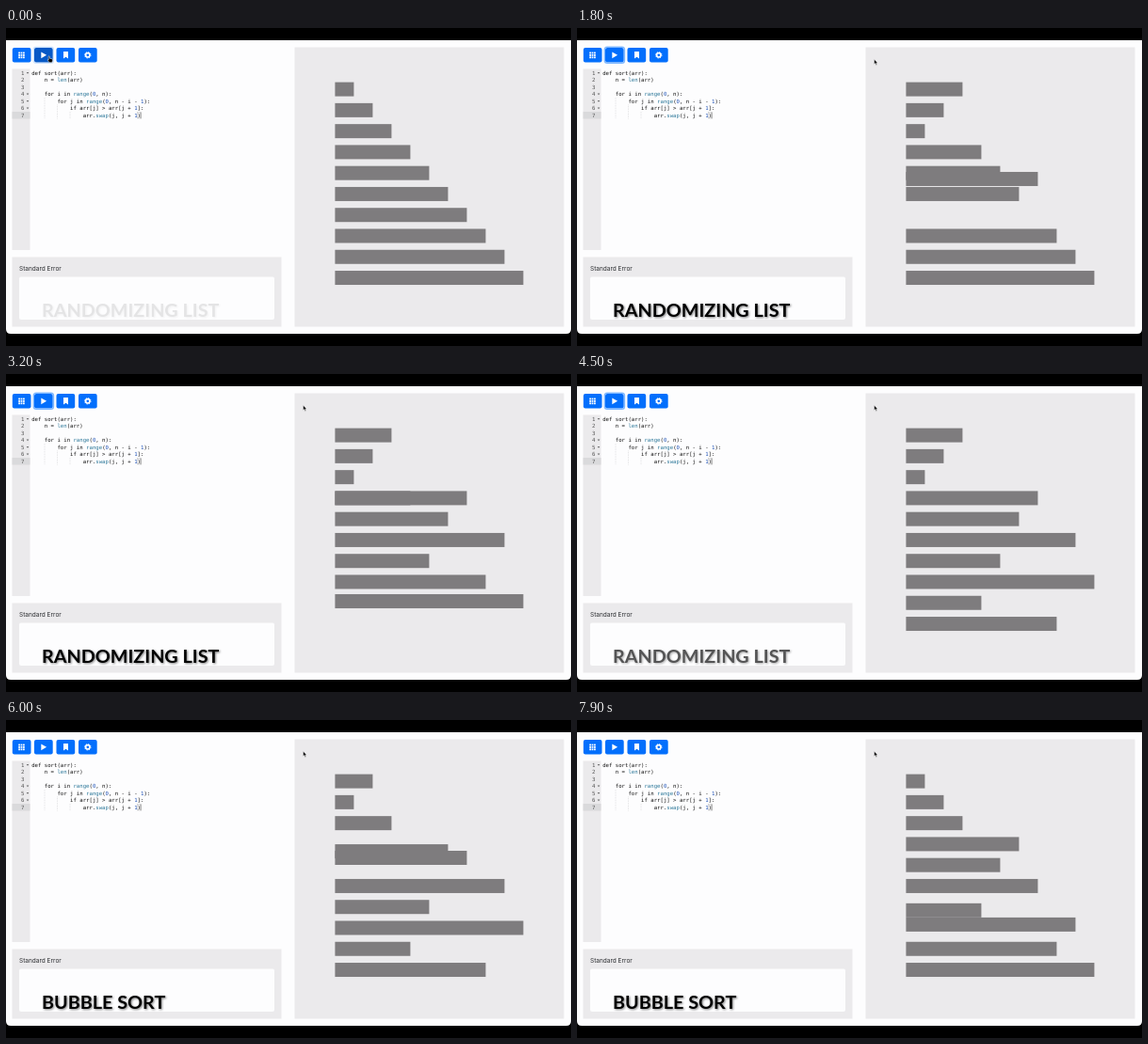
Write an HTML page that moves like this. It is 600x338 px and loops after 8 s.

```html
<!DOCTYPE html>
<html lang="en">
<head>
<meta charset="utf-8">
<title>Bubble sort</title>
<style>
  html, body { margin: 0; width: 100%; height: 100%; overflow: hidden; background: #000; }
  svg { display: block; width: 100vw; height: 100vh; }
  .panel { fill: #ebeaec; }
  .page { fill: #fdfdfe; }
  .button { fill: #036ffc; }
  .icon { fill: #fff; }
  .code { font: 5.66px "DejaVu Sans Mono", monospace; fill: #111; white-space: pre; }
  .fn { fill: #2b7799; }
  .num { fill: #2456b8; }
  .gutter { fill: #555; text-anchor: end; }
  .guide { stroke: #c4c4c8; stroke-width: .5; stroke-dasharray: .8 .8; }
  .heading { font: 6.5px Inter, sans-serif; fill: #2b2d30; }
  .label { font: 700 19.8px Lato, sans-serif; filter: drop-shadow(1px 1.5px 1px rgba(0, 0, 0, .5)); }
  #bars { fill: #7e7c7e; }
</style>
</head>
<body>
<svg viewBox="0 0 600 338">
  <rect width="600" height="338"/>
  <path class="page" d="M0 13H600V320q0 5-5 5H5q-5 0-5-5z"/>

  <g id="buttons"></g>
  <rect id="ring" x="29.3" y="20.3" width="21.2" height="16.9" rx="2.8" fill="none" stroke="#7fb8ff" stroke-width="1.4"/>
  <g class="icon">
    <g id="grid"></g>
    <path d="M37.3 25.4L43.1 28.8L37.3 32.2z"/>
    <path d="M61 25h5v7.5l-2.5-1.8-2.5 1.8z"/>
    <circle cx="86.8" cy="28.8" r="2.2" fill="none" stroke="#fff" stroke-width="1.7"/>
    <circle cx="86.8" cy="28.8" r="3.2" fill="none" stroke="#fff" stroke-width="1" stroke-dasharray="1.26 1.253"/>
  </g>

  <rect class="panel" x="6.5" y="43.5" width="19" height="192.5"/>
  <rect x="6.5" y="89" width="19" height="7.5" fill="#dadadc"/>
  <path class="guide" d="M41 74V96.5M54.5 81.5V96.5M68 89V96.5"/>
  <g id="code"></g>
  <rect x="139.3" y="89.6" width="3.4" height="6.4" fill="none" stroke="#c0c0c0" stroke-width=".5"/>
  <path d="M143.2 89.4V96.4" stroke="#555" stroke-width=".6"/>

  <rect class="panel" x="6.5" y="243.5" width="286" height="74"/>
  <text class="heading" x="14" y="258.3">Standard Error</text>
  <rect class="page" x="14" y="264.5" width="271" height="45.5" rx="2"/>
  <rect class="panel" x="306.5" y="20.5" width="286" height="297"/>
  <g id="bars"></g>

  <text class="label" id="shuffleLabel" x="38" y="307">RANDOMIZING LIST</text>
  <text class="label" id="sortLabel" x="38" y="307">BUBBLE SORT</text>

  <g stroke="#fff" stroke-width=".5" stroke-linejoin="round">
    <path id="hand" d="M45.2 30q.8-.6 1.2.3v2l2.6.6q.7.3.5 1.2l-.5 2.6h-3l-2-2.7q.2-.8 1.2 0z"/>
    <path id="arrow" d="M0 0V6.2L1.5 4.9L2.5 7.2L3.5 6.8L2.5 4.5H4.4z"/>
  </g>
</svg>
<script>
const LOOP = 8000;
const SHUFFLED = [3, 2, 1, 7, 6, 9, 5, 10, 4, 8];
const SHUFFLE = { start: 553, step: 352, duration: 350 };
const SORT = { start: 5256, step: 312, duration: 200 };

const $ = id => document.getElementById(id);
const add = (parent, tag, attrs, html = "") => {
  const el = document.createElementNS("http://www.w3.org/2000/svg", tag);
  for (const key in attrs) el.setAttribute(key, attrs[key]);
  el.innerHTML = html;
  return parent.appendChild(el);
};
const clamp = x => Math.min(1, Math.max(0, x));
const ease = x => (x = clamp(x), x * x * (3 - 2 * x));
const ramp = (t, from, to) => clamp((t - from) / (to - from));
const progress = (t, phase, n) => ease((t - phase.start - n * phase.step) / phase.duration);

const buttons = [6.8, 30, 53.5, 77].map(x =>
  add($("buttons"), "rect", { class: "button", x, y: 21, width: 19.7, height: 15.5, rx: 2 }));
for (let i = 0; i < 9; i++)
  add($("grid"), "rect", { x: 13.2 + i % 3 * 2.4, y: 25.6 + Math.floor(i / 3) * 2.4, width: 1.8, height: 1.8 });

const lines = [
  "def sort(arr):",
  "    n = len(arr)",
  "",
  "    for i in range(0, n):",
  "        for j in range(0, n - i - 1):",
  "            if arr[j] > arr[j + 1]:",
  "                arr.swap(j, j + 1)",
];
lines.forEach((line, i) => {
  const y = 49.6 + i * 7.5;
  const html = line.replace(">", "&gt;").replace(/\b(len|range|swap)\b|\d/g,
    m => `<tspan class="${isNaN(m) ? "fn" : "num"}">${m}</tspan>`);
  add($("code"), "text", { class: "code", x: 27.2, y }, html);
  add($("code"), "text", { class: "code gutter", x: 19.5, y }, i + 1);
  if (line.endsWith(":")) add($("code"), "path", { d: `M21.7 ${y - 2.6}h2.6l-1.3 1.7z`, fill: "#666" });
});

const bars = SHUFFLED.map((_, i) =>
  add($("bars"), "rect", { x: 349.4, width: 20 * (i + 1), height: 15 }));

// Every swap of the bubble sort, as [value moving down, value moving up].
const swaps = [];
const list = [...SHUFFLED];
for (let i = 0; i < list.length; i++)
  for (let j = 0; j < list.length - i - 1; j++)
    if (list[j] > list[j + 1]) {
      swaps.push([list[j], list[j + 1]]);
      [list[j], list[j + 1]] = [list[j + 1], list[j]];
    }

function slotsAt(t) {
  const slots = [];
  SHUFFLED.forEach((value, slot) => {
    const home = value - 1;
    slots[home] = home + (slot - home) * progress(t, SHUFFLE, slot);
  });
  swaps.forEach(([down, up], n) => {
    const p = progress(t, SORT, n);
    slots[down - 1] += p;
    slots[up - 1] -= p;
  });
  return slots;
}

function draw(t) {
  slotsAt(t).forEach((slot, i) => bars[i].setAttribute("y", 57.6 + 22.27 * slot));

  $("shuffleLabel").style.opacity = ramp(t, -30, 300) * (1 - ramp(t, 4390, 4720));
  $("sortLabel").style.opacity = ramp(t, 4790, 5120);

  const hovering = t < 100;
  buttons[1].style.fill = hovering ? "#0759c6" : "";
  $("ring").style.opacity = hovering ? .35 : t < 5200 ? 1 : 0;
  $("hand").style.display = hovering ? "" : "none";
  $("arrow").style.display = hovering ? "none" : "";
  const x = 46 + 259 * ease(ramp(t, 40, 290)) + 10.6 * ease(ramp(t, 450, 650));
  const y = 30 + 3.3 * ease(ramp(t, 40, 290));
  $("arrow").setAttribute("transform", `translate(${x} ${y}) scale(.85)`);
}

const begin = performance.now();
function frame() {
  draw((performance.now() - begin) % LOOP);
  requestAnimationFrame(frame);
}
frame();
</script>
</body>
</html>
```
